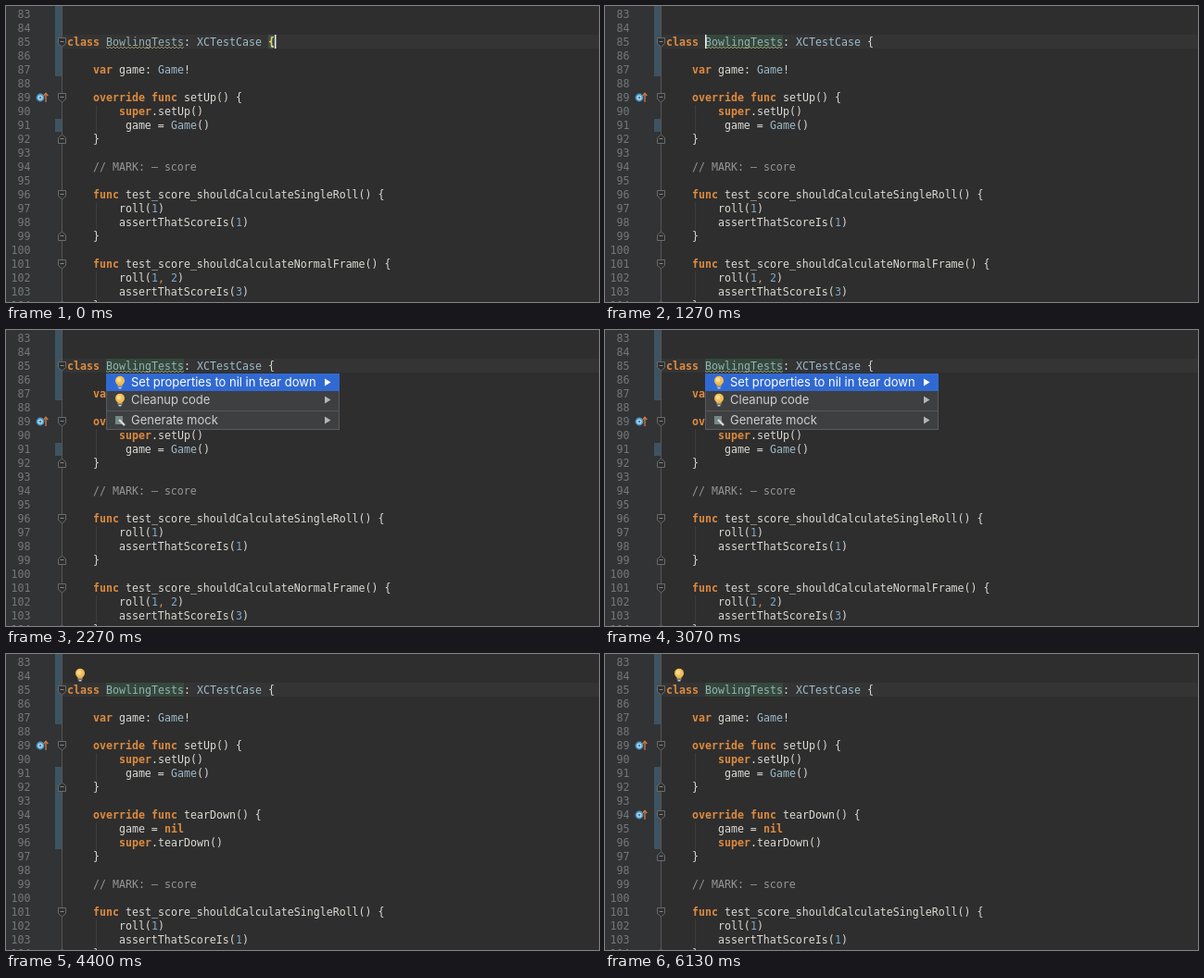
Animation of 640x320 px, one loop 6190 ms. Source, as an HTML page with a canvas:

```html
<!DOCTYPE html>
<html lang="en">
<head>
<meta charset="utf-8">
<title>Code editor</title>
<style>
  html, body { margin: 0; width: 100%; height: 100%; overflow: hidden; background: #2e2e2e; }
  canvas { display: block; }
</style>
</head>
<body>
<canvas id="stage" width="640" height="320"></canvas>
<script>
const ctx = document.getElementById('stage').getContext('2d');
const LOOP = 6190, FIRST = 83, ROW = 15, CHAR = 7, LEFT = 66;
const MONO = '11.627px "DejaVu Sans Mono", monospace';
const UI = '13px Inter, sans-serif';

// Moments at which the editor state changes, in ms
const JUMP = 800, OPEN = 2000, CLOSE = 3330, INSERT = 3400,
      COLOUR = 3730, BULB = 4130, GUTTER = 4930, SAVE = 5400, BULB_AGAIN = 5730;

const head = ['', '', 'class BowlingTests: XCTestCase {', '', '    var game: Game!', '',
  '    override func setUp() {', '        super.setUp()', '         game = Game()', '    }', ''];
const added = ['    override func tearDown() {', '        game = nil', '        super.tearDown()', '    }', ''];
const tail = ['    // MARK: – score', '',
  '    func test_score_shouldCalculateSingleRoll() {', '        roll(1)', '        assertThatScoreIs(1)', '    }', '',
  '    func test_score_shouldCalculateNormalFrame() {', '        roll(1, 2)', '        assertThatScoreIs(3)', '    }'];

const TOKEN = /(\/\/.*|\b(?:class|var|override|func|super|nil)\b|\b(?:BowlingTests|XCTestCase|Game)\b|\b\d+|,)/;
const PLAIN = '#dcdad5', ORANGE = '#de8b3f';

const mid = i => 9 + i * ROW;

function rect(x, y, w, h, color) {
  ctx.fillStyle = color;
  ctx.fillRect(x, y, w, h);
}

function text(str, x, y, color, font = MONO, align = 'left') {
  ctx.font = font;
  ctx.textAlign = align;
  ctx.fillStyle = color;
  ctx.fillText(str, x, y);
}

function path(points, color, fill, width = 1) {
  ctx.beginPath();
  points.forEach(([x, y]) => ctx.lineTo(x, y));
  if (fill) {
    ctx.fillStyle = fill;
    ctx.fill();
  }
  if (color) {
    ctx.strokeStyle = color;
    ctx.lineWidth = width;
    ctx.stroke();
  }
}

function disc(x, y, r, color) {
  ctx.beginPath();
  ctx.arc(x, y, r, 0, 7);
  ctx.fillStyle = color;
  ctx.fill();
}

function style(token) {
  if (token.startsWith('//')) return ['#969696', MONO];
  if (token === ',') return [ORANGE, MONO];
  if (/^\d/.test(token)) return ['#7fa9c9', MONO];
  if (/^[A-Z]/.test(token)) return [token === 'BowlingTests' ? '#94b1b5' : '#9dbac9', MONO];
  return [ORANGE, 'bold ' + MONO];
}

function codeLine(line, y, coloured) {
  let x = LEFT;
  line.split(coloured ? TOKEN : /$^/).forEach((part, i) => {
    const [color, font] = i % 2 ? style(part) : [PLAIN, MONO];
    text(part, x, y, color, font);
    x += part.length * CHAR;
  });
}

function fold(y, down) {
  const s = down ? 1 : -1;
  const shape = [[56.5, y - 4.5 * s], [64.5, y - 4.5 * s], [64.5, y + 1.5 * s],
    [60.5, y + 5 * s], [56.5, y + 1.5 * s], [56.5, y - 4.5 * s]];
  path(shape, '#696b6c', '#2e2e2e');
  path([[58.5, y - .5], [62.5, y - .5]], '#858789');
}

function overrideMark(y) {
  disc(37, y, 4.4, '#4798c7');
  disc(37, y, 2.6, '#d5e5ee');
  disc(37, y, 1.5, '#3c86b3');
  path([[43, y + 5], [43, y - 4]], '#d47b43', null, 1.3);
  path([[40.7, y - 2], [43, y - 4.7], [45.3, y - 2]], '#d47b43', null, 1.2);
}

function bulb(x, y) {
  disc(x, y - 1.7, 5, '#f3bd55');
  disc(x - 1, y - 2.5, 2.4, '#fbdd91');
  rect(x - 2.5, y + 2, 5, 2, '#e8b04b');
  rect(x - 2.5, y + 4, 5, 1, '#aaa');
  rect(x - 1.5, y + 5.5, 3, 1.5, '#ccc');
}

function squiggle(y) {
  const points = Array.from({ length: 43 }, (_, i) => [108 + i * 2, y + (i % 2 ? 1 : -1)]);
  path(points, '#9c9a68', null, .9);
}

function menu() {
  rect(108, 47, 252, 61, '#3d3f41');
  rect(108, 47, 252, 19, '#3169d3');
  rect(108, 87, 252, 1, '#55585a');
  ctx.strokeStyle = '#595b5d';
  ctx.lineWidth = 1;
  ctx.strokeRect(108.5, 47.5, 251, 60);
  rect(108, 47, 252, 19, '#3169d3');
  [['Set properties to nil in tear down', 57], ['Cleanup code', 76], ['Generate mock', 98]].forEach(([label, y], i) => {
    text(label, 135, y + 4, i ? '#cfcfcf' : '#fff', UI);
    path([[344, y - 4.5], [350.5, y - .5], [344, y + 3.5]], null, i ? '#b4b4b4' : '#fff');
    if (i < 2) bulb(123, y - .5);
  });
  rect(118, 93, 8, 9, '#7d8588');
  path([[119, 95], [123, 99]], '#4fa067', null, 2);
  path([[122, 97], [128, 103]], '#d8d8d8', null, 2.4);
}

// The caret blinks with 600 ms on and 600 ms off, restarting after each action
function caretOn(t) {
  if (t >= OPEN && t < CLOSE) return false;
  const start = t < JUMP ? 0 : t < OPEN ? JUMP : t < SAVE ? CLOSE : SAVE;
  return (t - start) % 1200 < 600;
}

function draw(t) {
  const inserted = t >= INSERT, jumped = t >= JUMP, marked = t >= GUTTER;
  const lines = [...head, ...(inserted ? added : []), ...tail];
  const isNew = i => inserted && i >= head.length && i < head.length + added.length;

  rect(0, 0, 640, 320, '#2e2e2e');
  rect(0, 0, 60, 320, '#313335');
  rect(60, 31, 580, 15, '#343434');
  rect(53, 0, 7, 76, '#3d5362');
  rect(53, 122, 7, inserted ? 89 : 14, '#3d5362');
  rect(60, 0, 1, 320, '#595552');

  if (jumped) rect(108, 31, 84, 15, '#35483c');
  else rect(283, 31, 7, 15, '#3b514d');

  lines.forEach((line, i) => {
    const y = mid(i), fresh = isNew(i);
    text(FIRST + i, 26.5, y + 4, '#74787b', MONO, 'right');
    if (/^ {8}/.test(line)) rect(97, y - 7, 1, ROW, '#3d3d3d');
    codeLine(line, y + 4, !fresh || t >= COLOUR);
    if (fresh && !marked) return;
    if (line.endsWith('{')) fold(y, true);
    if (line.trim() === '}') fold(y, false);
    if (line.includes('override')) overrideMark(y);
  });

  if (!jumped) text('{', 283, 43, '#f0ce62', 'bold ' + MONO);
  if (t < COLOUR) squiggle(45);
  if (caretOn(t)) rect(jumped ? 108 : 290, 31, 1.5, 15, '#e8e8e8');
  if (t >= BULB && t < SAVE || t >= BULB_AGAIN) bulb(80, 22.5);
  if (t >= OPEN && t < CLOSE) menu();
}

const begin = performance.now();
function tick() {
  draw((performance.now() - begin) % LOOP);
  requestAnimationFrame(tick);
}
tick();
</script>
</body>
</html>
```
